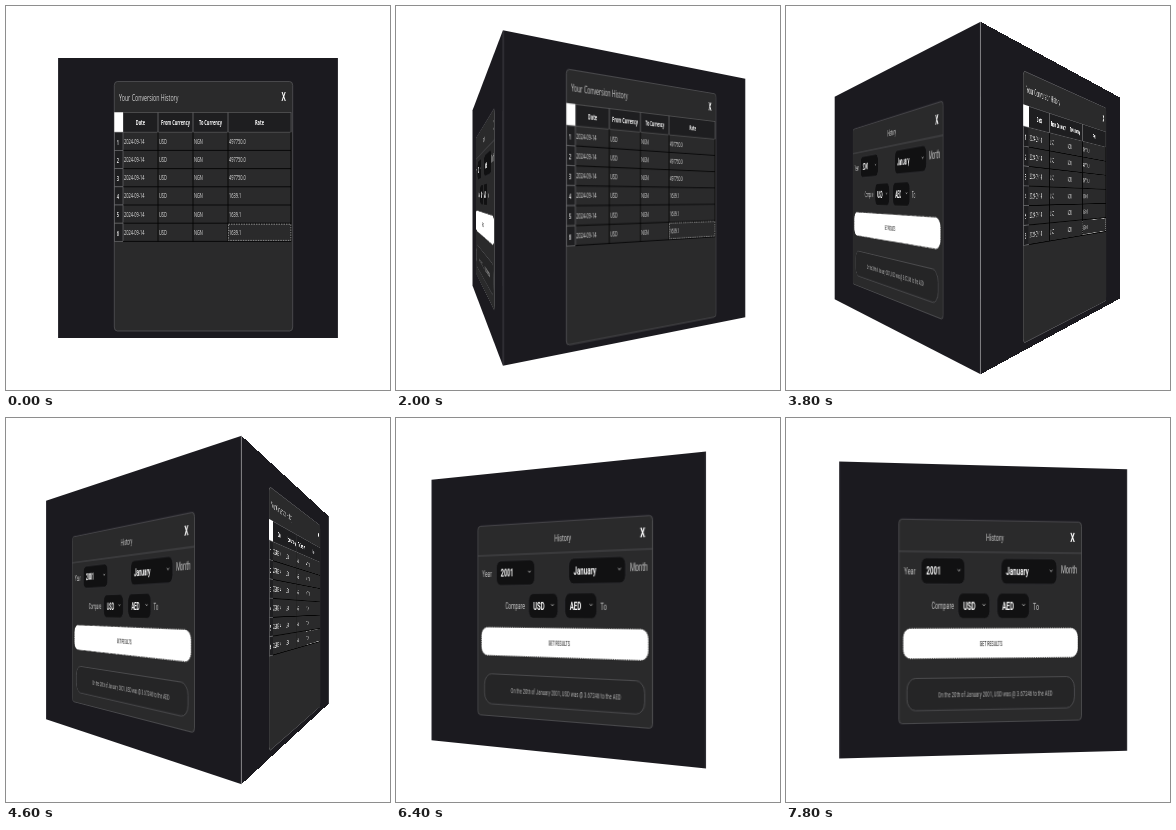
Animation of 384 by 384 pixels, one loop 8 s. Source, as an HTML page:

```html
<!DOCTYPE html>
<html lang="en">
<head>
<meta charset="utf-8">
<title>Currency cube</title>
<style>
  html, body { margin: 0; width: 100%; height: 100%; overflow: hidden; background: #fff; }
  #stage { position: relative; width: 384px; height: 384px; overflow: hidden; }
  .face { position: absolute; left: 52px; top: 52px; width: 280px; height: 280px; transform-origin: 50% 50%; }
  .sans { font-family: "Open Sans", "Noto Sans", sans-serif; }
  .din { font-family: Roboto, Inter, sans-serif; }
</style>
</head>
<body>
<div id="stage">
  <svg class="face sans" viewBox="0 0 280 280"></svg>
  <svg class="face din" viewBox="0 0 280 280"></svg>
</div>
<script>
const STEP = 200, STEPS = 40, TURN = 2.4;
const HALF = 140, FOCUS = 334, DIST = 3.31;
const SQUEEZE = 9 / 16; // wide screens squeezed onto square faces

const text = (x, y, size, str, { fill = '#e8e8e8', weight = 400, anchor = 'start' } = {}) =>
  `<text transform="translate(${x} ${y}) scale(${SQUEEZE} 1)" font-size="${size}" fill="${fill}"
    font-weight="${weight}" text-anchor="${anchor}">${str}</text>`;

const box = (x0, y0, x1, y1, fill, stroke = 'none', rx = 0, ry = rx, extra = '') =>
  `<rect x="${x0}" y="${y0}" width="${x1 - x0}" height="${y1 - y0}" rx="${rx}" ry="${ry}"
    fill="${fill}" stroke="${stroke}" stroke-width=".7" ${extra}/>`;

const path = (d, stroke, width = .7) =>
  `<path d="${d}" fill="none" stroke="${stroke}" stroke-width="${width}"/>`;

const wall = () => box(0, 0, 280, 280, '#1b1a1f') +
  path('M.2 0V280M279.8 0V280', '#65656a', .4);

const bold = { weight: 700, fill: '#fff' };
const mid = { anchor: 'middle' };

function historyTable() {
  const cols = [65, 100, 135, 170, 233];
  const heads = ['Date', 'From Currency', 'To Currency', 'Rate'];
  const top = 74.2, pitch = 18.2, end = top + 6 * pitch;
  let out = wall() + box(56.3, 23.5, 234.7, 273, '#2a2a2b', '#5a5a5c', 3, 4);
  out += text(61, 42.6, 9.4, 'Your Conversion History', { fill: '#d4d4d4' });
  out += text(225.7, 42.5, 11.5, 'X', { ...bold, ...mid });
  out += box(56.5, 54.5, 233, top, '#1e1e20', '#5a5a5c');
  heads.forEach((h, i) => {
    const x = (cols[i] + cols[i + 1]) / 2;
    out += path(`M${cols[i]} 54.5V${top}`, '#77777a');
    out += text(x, 67, 7, h, { ...bold, ...mid });
  });
  out += box(56.3, 54.3, 65, top, '#fff');
  for (let r = 0; r < 6; r++) {
    const y = top + r * pitch, base = y + 11.6;
    out += box(56.5, y, 65, y + pitch, '#1e1e20', '#68686b');
    out += text(59.8, base + .8, 7, r + 1, { ...bold, weight: 600, ...mid });
    const row = ['2024-09-14', 'USD', 'NGN', r < 3 ? '497750.0' : '1639.1'];
    row.forEach((s, i) => out += text(cols[i] + 1, base, 7, s));
    out += path(`M65 ${y + pitch}H233`, '#050505', .9);
  }
  cols.slice(1).forEach(x => out += path(`M${x} ${top}V${end}`, '#050505', .9));
  return out + box(170.5, end - pitch + 1, 232.8, end - 1, 'none', '#b5b5b5', 0, 0,
    'stroke-dasharray="1.5 1"');
}

function select(x0, y0, x1, y1, label) {
  const x = x1 - 5.8, y = (y0 + y1) / 2 - 1;
  return box(x0, y0, x1, y1, '#111112', '#333335', 5, 7) +
    text(x0 + 5, y + 4.8, 10.9, label, bold) +
    path(`M${x - 1.3} ${y - .7}l1.3 1.7 1.3 -1.7`, '#ccc', .7);
}

function historyForm() {
  const soft = { fill: '#c8c8c8' };
  return wall() +
    box(55.7, 53.3, 233.5, 248.5, '#2a2a2b', '#5a5a5c', 3, 4) +
    path('M55.7 84H233.5', '#5a5a5c') +
    text(147.6, 73, 9.6, 'History', { ...soft, ...mid }) +
    text(224.5, 73, 12.8, 'X', { ...bold, ...mid }) +
    text(60.5, 106.3, 9.8, 'Year', soft) +
    select(76.5, 90, 118.6, 115, '2001') +
    select(153.6, 90, 208.9, 114.8, 'January') +
    text(212.9, 104, 10.1, 'Month', soft) +
    text(86.5, 139.4, 9.4, 'Compare', soft) +
    select(111.9, 123.6, 142.8, 148.3, 'USD') +
    select(149.7, 123.6, 181.6, 148.3, 'AED') +
    text(185, 139.5, 9.6, 'To', soft) +
    box(59.5, 157.5, 230, 186.7, '#fff', '#111', 7, 9, 'stroke-dasharray="1.2 1"') +
    text(143.8, 175, 6.4, 'GET RESULTS', { fill: '#111', ...mid }) +
    box(63.3, 205.5, 226.4, 236.3, '#252526', '#5a5a5c', 8, 11) +
    text(148.6, 223.8, 7.4, 'On the 20th of January 2001, USD was @ 3.67246 to the AED',
      { fill: '#b0b0b0', ...mid });
}

const faces = [...document.querySelectorAll('.face')];
faces[0].innerHTML = historyTable();
faces[1].innerHTML = historyForm();

function draw(ms) {
  const step = Math.floor(ms / STEP) % STEPS;
  faces.forEach((face, i) => {
    const angle = step * TURN - i * 90;
    const seen = Math.cos(angle * Math.PI / 180) * DIST > 1;
    face.style.visibility = seen ? 'visible' : 'hidden';
    // The resting pose is flat, without perspective
    face.style.transform = step === 0 ? 'none' :
      `perspective(${FOCUS}px) translateZ(${FOCUS - DIST * HALF}px) rotateY(${angle}deg) translateZ(${HALF}px)`;
  });
}

const start = performance.now();
function tick() {
  draw(performance.now() - start);
  requestAnimationFrame(tick);
}
tick();
</script>
</body>
</html>
```
